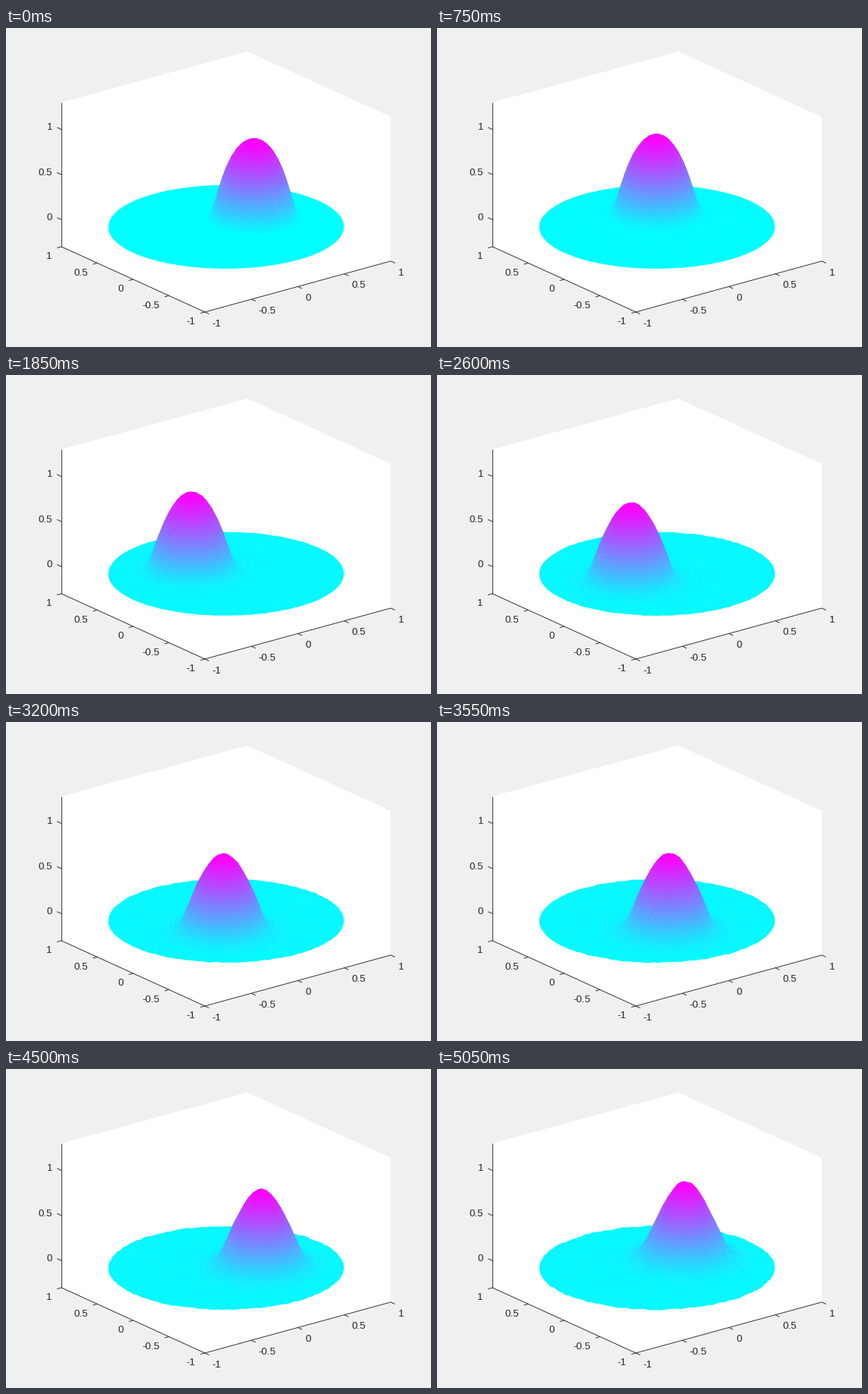
Recreate the animation shown at these times as a matplotlib script. Size 560 by 420 pixels, loop 5100 ms.

```python
import numpy as np
import matplotlib.pyplot as plt
from matplotlib.animation import FuncAnimation
from matplotlib.tri import Triangulation

W, H, DPI = 560, 420, 100
FRAMES, INTERVAL = 102, 50
INK = "#262626"
PX = 72 / DPI

plt.rcParams["font.family"] = "Liberation Sans"

# Oblique projection: screen position of the origin and of one unit per axis
ORIGIN = np.array([290.0, 261.8])
EX = np.array([122.5, -33.5])
EY = np.array([-94.5, -43.0])
EZ = np.array([0, -118.75])
Z0, Z1 = -0.3, 1.3


def project(x, y, z):
    return [ORIGIN[i] + EX[i] * x + EY[i] * y + EZ[i] * z for i in (0, 1)]


fig = plt.figure(figsize=(W / DPI, H / DPI), dpi=DPI, facecolor="#f0f0f0")
ax = fig.add_axes([0, 0, 1, 1])
ax.set(xlim=(0, W), ylim=(H, 0))
ax.axis("off")
ax.set_autoscale_on(False)


def line(p, q):
    ax.plot([p[0], q[0]], [p[1], q[1]], color=INK, lw=0.9 * PX,
            solid_capstyle="butt", zorder=2)


def tick(p, d):
    line(p, (p[0] + d[0], p[1] + d[1]))


def label(x, y, value, ha):
    ax.text(x, y + 4.2, f"{value:g}", ha=ha, va="baseline", color=INK,
            fontsize=13.33 * PX, zorder=2)


def draw_box():
    outline = [(-1, 1, Z0), (-1, 1, Z1), (1, 1, Z1),
               (1, -1, Z1), (1, -1, Z0), (-1, -1, Z0)]
    ax.fill(*zip(*[project(*c) for c in outline]), color="white", lw=0,
            zorder=0)
    near, left = project(-1, -1, Z0), project(-1, 1, Z0)
    line(near, project(1, -1, Z0))
    line(near, left)
    line(left, project(-1, 1, Z1))
    for v in (-1, -0.5, 0, 0.5, 1):
        p = project(v, -1, Z0)
        tick(p, (5.6, 2.6))
        label(p[0] + 9.6, p[1] + 14.6, v, "left")
        p = project(-1, v, Z0)
        tick(p, (-5.8, 1.6))
        label(p[0] - 12.2, p[1] + 12.3, v, "right")
    for v in (0, 0.5, 1):
        p = project(-1, 1, v)
        tick(p, (-5.8, -2.6))
        label(p[0] - 11.7, p[1] - 3.6, v, "right")


def disk_mesh(rings, rng):
    pts = [(0, 0)]
    for i in range(1, rings + 1):
        n = 6 * i
        a = 2 * np.pi * (np.arange(n) + 0.5 * (i % 2)) / n
        r = i / rings
        ring = np.c_[r * np.cos(a), r * np.sin(a)]
        if i < rings:
            ring += rng.normal(0, 0.004, ring.shape)
        pts.extend(ring)
    x, y = np.array(pts).T
    tris = Triangulation(x, y).triangles
    # Paint far triangles first
    depth = project(x, y, 0)[1][tris].mean(axis=1)
    return x, y, tris[np.argsort(depth)]


rng = np.random.default_rng(4)
X, Y, TRIS = disk_mesh(26, rng)
PHASE = rng.uniform(0, 2 * np.pi, X.size)
RATE = rng.uniform(0.2, 0.6, X.size)
DOTTED = rng.random(X.size) < 0.6


def surface(k):
    """Height, smooth bump, peak and visibility of every mesh point."""
    a = 2 * np.pi * k / 101
    age = k / FRAMES
    dx, dy = X - 0.3 * np.cos(a), Y - 0.3 * np.sin(a)
    r2 = dx**2 + dy**2
    q = np.minimum(r2 / 0.424**2, 0.999)
    # The compact bump slowly diffuses into a Gaussian
    blend = 0.75 * age
    shape = (1 - blend) * np.exp(-q / (1 - q)) + blend * np.exp(-r2 / 0.08)
    peak = 0.884 - 0.016 * age
    ripple = 0.006 * age * np.sin(PHASE + RATE * k)
    front = EX[1] * dx + EY[1] * dy > 3
    aside = abs(EX[0] * dx + EY[0] * dy) > 66
    return peak * shape + ripple, peak * shape, peak, front | aside


draw_box()
sx, sy = project(X, Y, 0)
tri = Triangulation(sx, sy, TRIS)
mesh = ax.tripcolor(tri, np.zeros(X.size), shading="gouraud", cmap="cool",
                    zorder=3)
dots = ax.scatter([], [], s=0.5, lw=0, zorder=4)


def update(k):
    z, bump, peak, visible = surface(k)
    tri.y = project(X, Y, z)[1]
    mesh.set_array(z)
    mesh.set_clim(-0.025 * min(1, k / 35), 0.985 * peak)
    show = visible & DOTTED & (bump < 0.4)
    faint = 0.25 * min(1, k / 60)
    alpha = np.where(bump > 0.01, 0.4, faint)[show]
    dots.set_offsets(np.c_[sx, tri.y][show])
    dots.set_facecolors(np.c_[np.ones((alpha.size, 3)), alpha])
    return mesh, dots


anim = FuncAnimation(fig, update, frames=FRAMES, interval=INTERVAL,
                     init_func=lambda: update(0), repeat=True)
plt.show()
```
